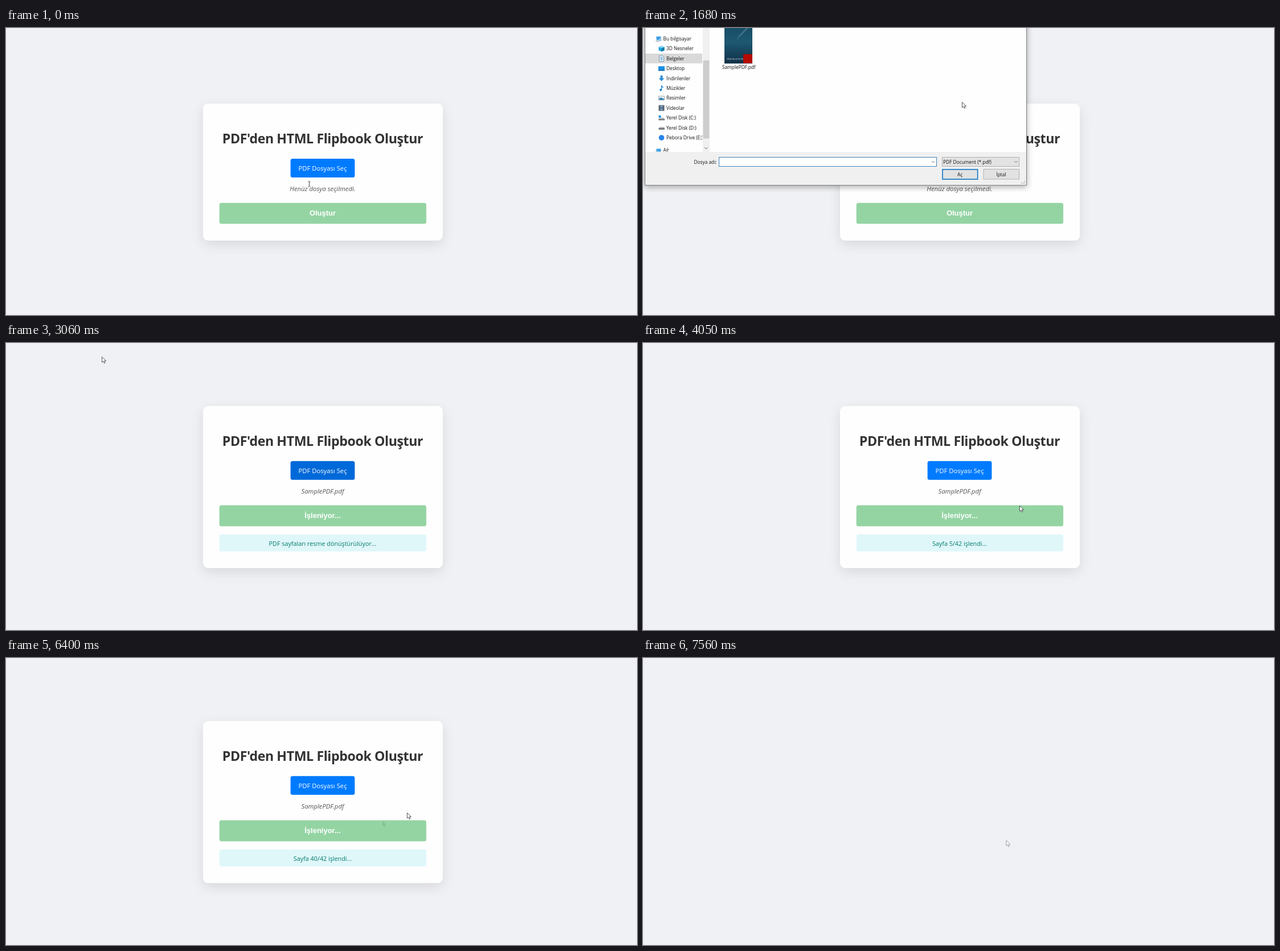
These frames come from a looping animation (1108 px wide and 505 px high, 8 s). An HTML page:

```html
<!DOCTYPE html>
<html lang="tr">
<head>
<meta charset="utf-8">
<title>PDF Flipbook</title>
<style>
  html, body { margin: 0; width: 100%; height: 100%; overflow: hidden; background: #f0f1f4; }
  #stage { position: relative; width: 1108px; height: 505px; overflow: hidden; background: #f0f1f4; }
  #stage svg { position: absolute; left: 0; top: 0; }
  #page, #dialog { position: absolute; inset: 0; }
  #card { position: absolute; left: 345.6px; width: 421.6px; border-radius: 9px; background: #fefefe;
    box-shadow: 0 7px 22px rgba(0, 0, 0, .1); }
  #frame { position: absolute; left: 3px; top: -40px; width: 669px; height: 315px; border: 1px solid #7c7c7e;
    background: #fefefe; box-shadow: 0 3px 10px rgba(0, 0, 0, .32); }
  text { font-family: "Open Sans", "Noto Sans", sans-serif; }
  .mid { text-anchor: middle; }
  .title { font-size: 23.2px; font-weight: 700; letter-spacing: -.42px; fill: #333; }
  .pick { font-size: 11.25px; fill: #fff; }
  .info { font-size: 11.3px; font-style: italic; fill: #555; }
  .go { font: 700 13px "Liberation Sans", Arial, sans-serif; fill: #fff; }
  .status { font-size: 10.78px; fill: #00796b; }
  .ui { font-size: 8.3px; fill: #111; }
</style>
</head>
<body>
<div id="stage">
  <div id="page">
    <div id="card"></div>
    <svg width="1108" height="505">
      <g id="form">
        <text class="mid title" x="556" y="203">PDF'den HTML Flipbook Oluştur</text>
        <rect id="pick" x="499.6" y="230" width="112.8" height="33" rx="3.5"/>
        <text class="mid pick" x="556" y="251.3">PDF Dosyası Seç</text>
        <text id="info" class="mid info" x="556" y="287"></text>
        <rect id="go" x="374.7" y="307.7" width="363.3" height="36.9" rx="3.5"/>
        <text id="goText" class="mid go" x="556" y="330"></text>
        <g id="statusBox">
          <rect x="374.7" y="359" width="363.3" height="30" rx="3.5" fill="#e0f7fa"/>
          <text id="status" class="mid status" x="556" y="379"></text>
        </g>
      </g>
      <path id="ghost" d="M661 286v10.5l2.4-2 1.5 3.2 1.5-.7-1.3-3.3h2.4z" fill="#8bbd98"/>
    </svg>
  </div>

  <div id="dialog">
    <div id="frame"></div>
    <svg width="1108" height="505">
      <defs>
        <linearGradient id="cover" x1="0" y1="0" x2="0" y2="1">
          <stop offset="0" stop-color="#16465f"/>
          <stop offset=".55" stop-color="#1d5871"/>
          <stop offset="1" stop-color="#102f45"/>
        </linearGradient>
        <clipPath id="sideClip"><rect x="4" y="0" width="100" height="217.5"/></clipPath>
      </defs>
      <rect x="4" y="218" width="669" height="57" fill="#f0f0f0"/>

      <g id="blank" fill="#fefefe">
        <rect x="89" y="230" width="41" height="11"/>
        <rect x="133" y="227" width="383" height="17"/>
        <rect x="525" y="227" width="136" height="17"/>
        <rect x="525" y="248" width="64" height="19"/>
        <rect x="597" y="248" width="64" height="19"/>
        <rect x="661" y="264" width="12" height="11"/>
      </g>

      <g id="full">
        <g clip-path="url(#sideClip)">
          <rect x="4" y="45" width="101" height="17.3" fill="#d9d9d9"/>
          <g id="side"></g>
        </g>
        <rect x="105" y="0" width="12" height="218" fill="#f0f0f0"/>
        <rect x="105.5" y="57" width="11" height="137.5" fill="#cdcdcd"/>

        <rect id="tile" x="130.5" y="-20" width="75.5" height="96.3"/>
        <rect x="143" y="-20" width="49" height="82.5" fill="url(#cover)"/>
        <path d="M167 15L187-5M171 14L190-6M165 20L183 0" stroke="#9fc3d3" stroke-width=".6" opacity=".65"/>
        <text x="146.5" y="55.5" font-size="2.9" fill="#cfe0e8">ÖRNEK BELGE DOSYASI</text>
        <rect x="176" y="46" width="16" height="16" rx="1.5" fill="#b30b00"/>
        <text class="mid ui" x="168.3" y="72">SamplePDF.pdf</text>

        <text class="ui" x="89.5" y="238.5">Dosya adı:</text>
        <rect x="133.5" y="227.5" width="382" height="16" fill="#fff" stroke="#3f83b5"/>
        <text id="fileName" class="ui" x="135.5" y="238.7">SamplePDF.pdf</text>
        <rect x="525.5" y="227.5" width="135" height="16" fill="#e3e3e3" stroke="#b0b0b0"/>
        <text class="ui" x="527" y="238.7">PDF Document (*.pdf)</text>
        <rect x="525.9" y="248.9" width="61.7" height="17.2" fill="#e2e2e2" stroke="#0f74c4" stroke-width="1.6"/>
        <text class="mid ui" x="556.5" y="260.7">Aç</text>
        <rect x="598" y="248.5" width="62.5" height="17.5" fill="#e2e2e2" stroke="#b0b0b0"/>
        <text class="mid ui" x="629" y="260.7">İptal</text>
        <path d="M507.2 234.2l2.5 2.5 2.5-2.5M652.5 234.2l2.5 2.5 2.5-2.5M108 210l2.8 2.8 2.8-2.8"
          fill="none" stroke="#555" stroke-width=".9"/>
        <path d="M670 269v1.4M670 272v1.4M667.5 272v1.4M665 272v1.4" stroke="#aaa" stroke-width="1.4"/>
      </g>
    </svg>
  </div>

  <svg width="1108" height="505">
    <circle id="click" cx="168.6" cy="24.8" r="9" fill="#b5b02c" opacity=".88"/>
    <g id="cursor">
      <path id="arrow" d="M.4.4V10l2.3-2 1.6 3.5 1.6-.7-1.5-3.4h3z" fill="#fff" stroke="#2b2b2b" stroke-width=".8"/>
      <path id="beam" d="M-2-4.5H-.5L0-4 .5-4.5H2M0-4V4M-2 4.5H-.5L0 4 .5 4.5H2" fill="none" stroke="#333" stroke-width=".9"/>
      <path id="hand" d="M0 1.2Q1-.6 2 1.2V5Q3.2 4.2 4 5.3 5 4.7 5.8 5.8 7.4 5.6 7.4 7V9.5L6.4 13H1.2L-2.4 8.6Q-2.6 7 0 8.2z"
        fill="#fff" stroke="#2b2b2b" stroke-width=".8"/>
    </g>
  </svg>
</div>

<script>
const LOOP = 8000;
const $ = id => document.getElementById(id);
const show = (id, on) => { $(id).style.display = on ? '' : 'none'; };
const put = (id, text) => { if ($(id).textContent !== text) $(id).textContent = text; };
const fill = (id, color) => $(id).setAttribute('fill', color);

// Last key whose time has been reached; values hold until the next key.
const held = (keys, t) => keys.filter(k => k[0] <= t).pop();

const cursorKeys = [
  [0, 532.5, 274.5, 'beam'],
  [160, 563, 252, 'hand'],
  [330, 564, 246, 'hand'],
  [500, 564, 243, 'hand'],
  [1000, 563.5, 243, 'arrow'],
  [1510, 647, 205, 'arrow'],
  [1680, 560, 130, 'arrow'],
  [1850, 400, 75, 'arrow'],
  [2020, 262, 45, 'arrow'],
  [2190, 185, 32, 'arrow'],
  [2360, 168.2, 24, 'arrow'],
  [3220, 260, 90, 'arrow'],
  [3390, 400, 180, 'arrow'],
  [3550, 540, 250, 'arrow'],
  [3720, 620, 280, 'arrow'],
  [3890, 650, 286, 'arrow'],
  [4050, 661, 286, 'arrow'],
  [4730, 690, 268, 'arrow'],
  [4900, 728.2, 247, 'arrow'],
  [6230, 722, 254, 'arrow'],
  [6400, 704, 272, 'arrow'],
  [6570, 681, 289.5, 'arrow'],
  [6740, 638, 320.5, 'hand'],
  [7400, 637.5, 320.5, 'arrow']
];
const pickKeys = [[0, '#007bff'], [160, '#0072ec'], [330, '#0069d9'], [3220, '#0072ec'], [3390, '#007bff']];
const goKeys = [
  [0, '#94d4a3', 'Oluştur'],
  [3060, '#94d4a3', 'İşleniyor...'],
  [6570, '#28a745', 'Flipbook Oluştur'],
  [6740, '#218838', 'Flipbook Oluştur']
];
const fadeKeys = [[0, 1], [7070, .8], [7240, .5], [7400, .2], [7560, 0]];
const tileKeys = [[0, 'none', 'none'], [2190, '#e5f3ff', 'none'], [2710, '#cce8ff', '#99d1ff']];

const icons = {
  pc: '<path d="M-4-4h8v6h-8z" fill="#3b9be0"/><path d="M-5 3h7v1.5h-7z" fill="#8ba3b5"/><path d="M1-1h4v5H1z" fill="#9cc9ea"/>',
  cube: '<path d="M-5-3L0-5 5-3V3L0 5-5 3z" fill="#22a5dc"/><path d="M0-1L5-3V3L0 5z" fill="#1678a8"/><path d="M-5-3L0-1 5-3 0-5z" fill="#7fd6f4"/>',
  doc: '<path d="M-4-5H2L4-3V5H-4z" fill="#eef6fb" stroke="#5c7f99" stroke-width=".8"/><path d="M-2-2H2M-2 0H2M-2 2H2" stroke="#3e8fc7"/>',
  desk: '<path d="M-5.5-4h11v8h-11z" fill="#1a8fe3"/><path d="M-5.5 2.5h11V4h-11z" fill="#0b62a8"/>',
  down: '<path d="M-2-5H2V0H5L0 5-5 0H-2z" fill="#2f8fd8"/>',
  music: '<path d="M0-5V3M0-5Q1-2 3.2-1" fill="none" stroke="#1583d8" stroke-width="1.3"/><circle cx="-1.4" cy="3" r="2" fill="#1583d8"/>',
  photo: '<path d="M-5-3.5H5V3.5H-5z" fill="#e8f1f7" stroke="#8798a5" stroke-width=".8"/><path d="M-4 3V0L-1-1 4 1V3z" fill="#2d7fae"/>',
  film: '<path d="M-5-5H5V5H-5z" fill="#3b3f46"/><path d="M-2.5-4.5h5v4h-5zM-2.5.5h5v4h-5z" fill="#6f9ac2"/><path d="M-4-5V5M4-5V5" stroke="#ddd" stroke-width=".9" stroke-dasharray="1 1"/>',
  disk: '<path d="M-5 0L-3-1.5H4L5.5 0V3H-5z" fill="#b9bdc1"/><path d="M-5 1H5.5V3H-5z" fill="#55595d"/>',
  sys: '<path d="M-5 1L-3-.5H4L5.5 1V4H-5z" fill="#b9bdc1"/><path d="M-5 2H5.5V4H-5z" fill="#6b7075"/><path d="M-5-4.5h4v4h-4z" fill="#1f93e0"/>',
  cloud: '<circle r="4.8" fill="#2a84ea"/>',
  net: '<path d="M-4-3H4V3H-4z" fill="#3b9be0"/><path d="M-5 0h4v4h-4z" fill="#74b9e6"/>'
};
const places = [
  ['pc', 'Bu bilgisayar'], ['cube', '3D Nesneler'], ['doc', 'Belgeler'], ['desk', 'Desktop'],
  ['down', 'İndirilenler'], ['music', 'Müzikler'], ['photo', 'Resimler'], ['film', 'Videolar'],
  ['sys', 'Yerel Disk (C:)'], ['disk', 'Yerel Disk (D:)'], ['cloud', 'Pebora Drive (E:)'], ['net', 'Ağ']
];
$('side').innerHTML = places.map(([icon, label], i) => {
  const root = icon === 'pc' || icon === 'net';
  const y = 19 + i * 17.4 + (icon === 'net' ? 5 : 0);
  return `<g transform="translate(${root ? 27.5 : 32.5} ${y})">${icons[icon]}</g>` +
    `<text class="ui" x="${root ? 35.5 : 41}" y="${y + 3}">${label}</text>`;
}).join('');

function statusText(t) {
  if (t < 3720) return 'PDF sayfaları resme dönüştürülüyor...';
  const step = Math.floor((t - 3714) / 167.2);
  return `Sayfa ${1 + Math.floor(step * 22 / 9)}/42 işlendi...`;
}

function render(t) {
  const busy = t >= 3060 && t < 6570;
  const shift = busy ? -22.2 : 0;
  $('page').style.opacity = held(fadeKeys, t)[1];
  $('card').style.top = 133 + shift + 'px';
  $('card').style.height = (busy ? 285 : 241) + 'px';
  $('form').setAttribute('transform', `translate(0 ${shift})`);
  fill('pick', held(pickKeys, t)[1]);
  put('info', t < 3060 ? 'Henüz dosya seçilmedi.' : 'SamplePDF.pdf');
  const [, goColor, goLabel] = held(goKeys, t);
  fill('go', goColor);
  put('goText', goLabel);
  show('statusBox', busy);
  if (busy) put('status', statusText(t));
  show('ghost', busy && t >= 4730);

  show('dialog', t >= 1000 && t < 2880);
  show('blank', t < 1180);
  show('full', t >= 1180);
  const [, tileFill, tileEdge] = held(tileKeys, t);
  fill('tile', tileFill);
  $('tile').setAttribute('stroke', tileEdge);
  const clicked = t >= 2710;
  show('fileName', clicked);
  show('click', clicked && t < 2880);

  const [, x, y, kind] = held(cursorKeys, t);
  $('cursor').setAttribute('transform', `translate(${x} ${y})`);
  $('cursor').style.opacity = t >= 7560 ? .5 : 1;
  ['arrow', 'beam', 'hand'].forEach(k => show(k, k === kind));
}

const start = performance.now();
function tick() {
  render((performance.now() - start) % LOOP);
  requestAnimationFrame(tick);
}
tick();
</script>
</body>
</html>
```
